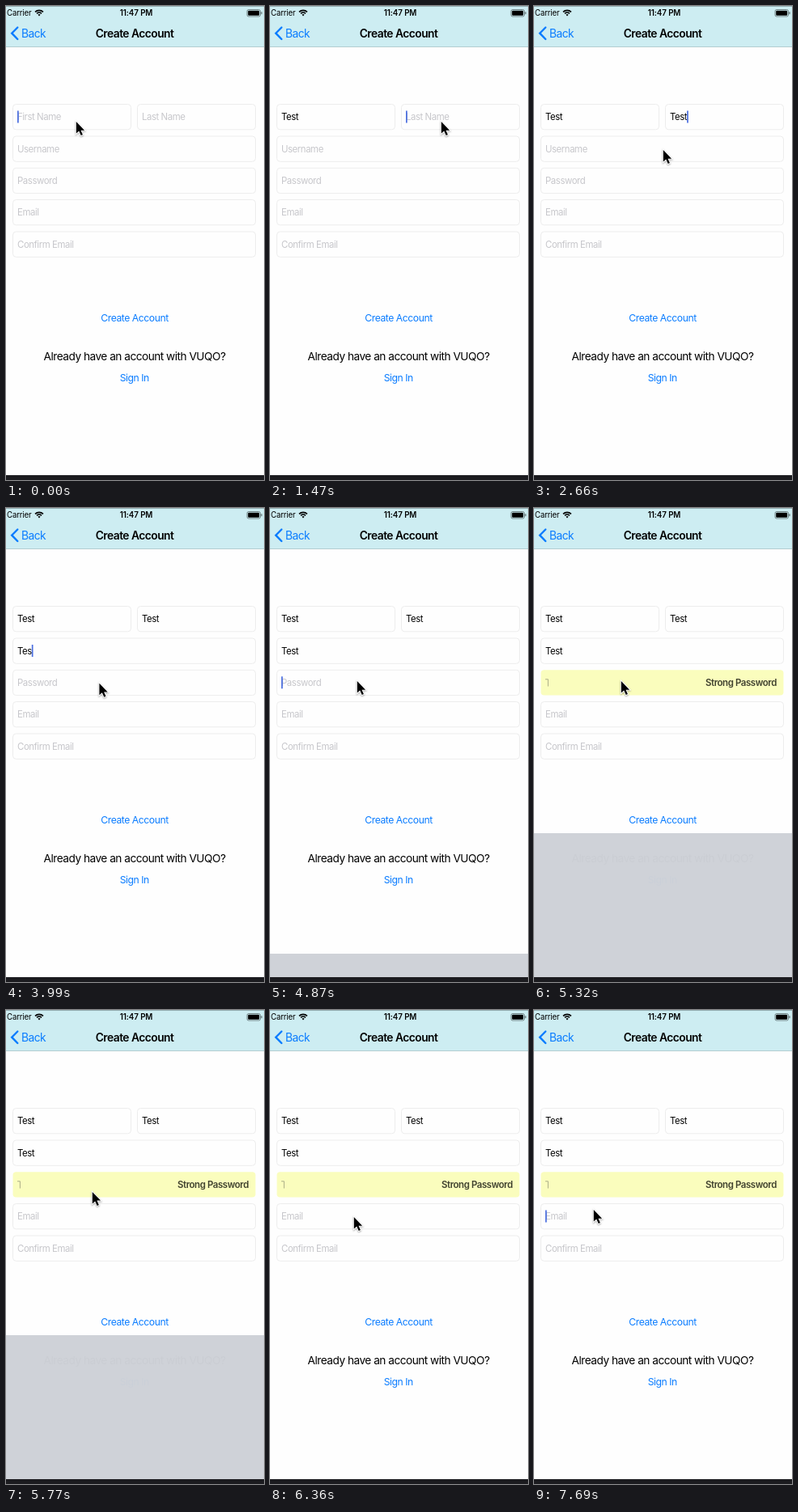
Recreate the animation shown at these times as an HTML page with a canvas. Size 319x586 px, loop 8 s.

```html
<!DOCTYPE html>
<html lang="en">
<head>
<meta charset="utf-8">
<title>Create Account</title>
<style>
html, body { margin: 0; width: 100%; height: 100%; overflow: hidden; background: #fefefe; }
canvas { display: block; width: 319px; height: 586px; }
</style>
</head>
<body>
<canvas id="stage"></canvas>
<script>
const W = 319, H = 586, LOOP = 8000, STEP = 148;
const BLUE = '#0a7cff', INK = '#000', HINT = '#c7c7cb', FLOOR = 580;
const canvas = document.getElementById('stage');
const dpr = window.devicePixelRatio || 1;
canvas.width = W * dpr;
canvas.height = H * dpr;
const c = canvas.getContext('2d');

// Each field: box, hint, and the steps at which the letters of "Test" arrive.
const fields = [
  { x: 8.5, y: 121.5, w: 146, hint: 'First Name', keys: [1, 3, 4, 5] },
  { x: 162.5, y: 121.5, w: 146, hint: 'Last Name', keys: [12, 13, 14, 15] },
  { x: 8.5, y: 161, w: 300, hint: 'Username', keys: [23, 25, 27, 29] },
  { x: 8.5, y: 200.3, w: 300, hint: 'Password', keys: [] },
  { x: 8.5, y: 239.5, w: 300, hint: 'Email', keys: [] },
  { x: 8.5, y: 279, w: 300, hint: 'Confirm Email', keys: [] }
];
const PASSWORD = 3, EMAIL = 4, FILLED = 35;

// Pairs of [step, value...]
const pointerPath = [
  [5, 86, 142], [9, 211, 142], [14, 211, 142], [18, 159, 177], [21, 159, 177],
  [28, 112, 218], [31, 107, 213], [38, 107, 213], [41, 103, 255], [47, 103, 255], [52, 73, 246]
];
const keyboardTop = [
  [32, FLOOR], [33, 551], [34, 455], [35, 409], [36, 402],
  [39, 402], [40, 418], [41, 490], [42, 560], [43, FLOOR]
];

function along(path, k, ease = u => u) {
  if (k <= path[0][0]) return path[0].slice(1);
  for (let i = 1; i < path.length; i++) {
    const [a, ...from] = path[i - 1], [b, ...to] = path[i];
    if (k <= b) {
      const u = ease((k - a) / (b - a));
      return from.map((v, j) => v + (to[j] - v) * u);
    }
  }
  return path[path.length - 1].slice(1);
}
const smooth = u => u * u * (3 - 2 * u);

function setFont(size, weight = 400, tracking = -0.038) {
  c.font = `${weight} ${size}px Inter, "Open Sans", sans-serif`;
  c.letterSpacing = `${size * tracking}px`;
}
function label(text, x, y, color, align = 'left') {
  c.fillStyle = color;
  c.textAlign = align;
  c.fillText(text, x, y);
}
function rect(x, y, w, h, color) {
  c.fillStyle = color;
  c.fillRect(x, y, w, h);
}
function round(x, y, w, h, r) {
  c.beginPath();
  c.roundRect(x, y, w, h, r);
}
function line(points, color, width) {
  c.beginPath();
  points.forEach(([x, y]) => c.lineTo(x, y));
  c.strokeStyle = color;
  c.lineWidth = width;
  c.stroke();
}

function drawHeader() {
  rect(0, 0, W, 50, '#cdedf2');
  rect(0, 50, W, 1, '#b3cdd1');
  rect(0, 0, W, 0.6, '#6f8488');

  setFont(9.7, 400, -0.02);
  label('Carrier', 1, 12, INK);
  setFont(9.8, 600, -0.01);
  label('11:47 PM', 161, 12, INK, 'center');

  c.strokeStyle = INK;
  c.lineWidth = 1.7;
  for (const r of [4.1, 7]) {
    c.beginPath();
    c.arc(41, 12.3, r, -Math.PI * 0.75, -Math.PI * 0.25);
    c.stroke();
  }
  c.fillStyle = INK;
  c.beginPath();
  c.moveTo(41, 12.5);
  c.arc(41, 12.3, 2.2, -Math.PI * 0.75, -Math.PI * 0.25);
  c.fill();

  round(298, 4.5, 16.5, 8.5, 2);
  c.strokeStyle = '#5d6c6e';
  c.lineWidth = 0.8;
  c.stroke();
  round(299.2, 5.7, 14, 6.1, 1);
  c.fill();
  rect(315.4, 7.2, 1.2, 3, '#5d6c6e');

  c.lineCap = 'round';
  line([[14.3, 26.5], [7.2, 33.7], [14.3, 41]], BLUE, 2.4);
  c.lineCap = 'butt';
  setFont(13.8);
  label('Back', 19, 38.5, BLUE);
  setFont(13.8, 600);
  label('Create Account', 159, 38.5, INK, 'center');
}

function caretField(k) {
  if (k < 10) return 0;
  if (k < 21) return 1;
  if (k < 33) return 2;
  if (k < FILLED) return PASSWORD;
  const lit = k === 41 || k === 42 || (k >= 45 && k < 49) || k >= 52;
  return lit ? EMAIL : -1;
}

function drawField(field, index, k) {
  const { x, y, w, hint, keys } = field;
  const filled = index === PASSWORD && k >= FILLED;
  round(x, y, w, 31.3, 4);
  if (filled) {
    c.fillStyle = '#fafdbd';
    c.fill();
    line([[14, 211.8], [17.4, 211.8], [17.4, 220.5]], '#a3a583', 0.9);
    setFont(11.5, 600);
    label('Strong Password', 212, y + 20, '#41422f');
    return;
  }
  c.strokeStyle = '#ededed';
  c.lineWidth = 1;
  c.stroke();
  const typed = 'Test'.slice(0, keys.filter(s => s <= k).length);
  setFont(11.4);
  label(typed || hint, x + 5.5, y + 19.7, typed ? INK : HINT);
  if (caretField(k) === index) {
    const offset = typed ? c.measureText(typed).width : 0;
    rect(x + 5.5 + offset, y + 8, 1.7, 15, '#4a6ee0');
  }
}

function drawPointer(x, y) {
  c.save();
  c.translate(x + 0.8, y + 1);
  c.beginPath();
  for (const [px, py] of [[0, 0], [0, 14.6], [3.4, 11.5], [5.9, 17], [8.1, 16], [5.7, 10.7], [10.3, 10.7]]) {
    c.lineTo(px, py);
  }
  c.closePath();
  c.shadowColor = 'rgba(0,0,0,.35)';
  c.shadowBlur = 2 * dpr;
  c.shadowOffsetY = dpr;
  c.strokeStyle = '#fff';
  c.lineWidth = 1.8;
  c.stroke();
  c.shadowColor = 'transparent';
  c.fillStyle = INK;
  c.fill();
  c.restore();
}

function draw(time) {
  const k = Math.floor((time % LOOP + 20) / STEP);
  c.setTransform(dpr, 0, 0, dpr, 0, 0);
  rect(0, 0, W, H, '#fefefe');
  drawHeader();
  fields.forEach((field, i) => drawField(field, i, k));

  setFont(12.2);
  label('Create Account', 159, 389.5, BLUE, 'center');
  label('Sign In', 158.7, 463.7, BLUE, 'center');
  setFont(13.7);
  label('Already have an account with VUQO?', 159, 437.5, INK, 'center');

  const [top] = along(keyboardTop, k);
  rect(0, top, W, FLOOR - top, 'rgba(207,210,216,.98)');
  rect(0, FLOOR, W, H - FLOOR, '#1b1b1f');
  drawPointer(...along(pointerPath, k, smooth));
}

function tick() {
  draw(performance.now());
  requestAnimationFrame(tick);
}
tick();
</script>
</body>
</html>
```
